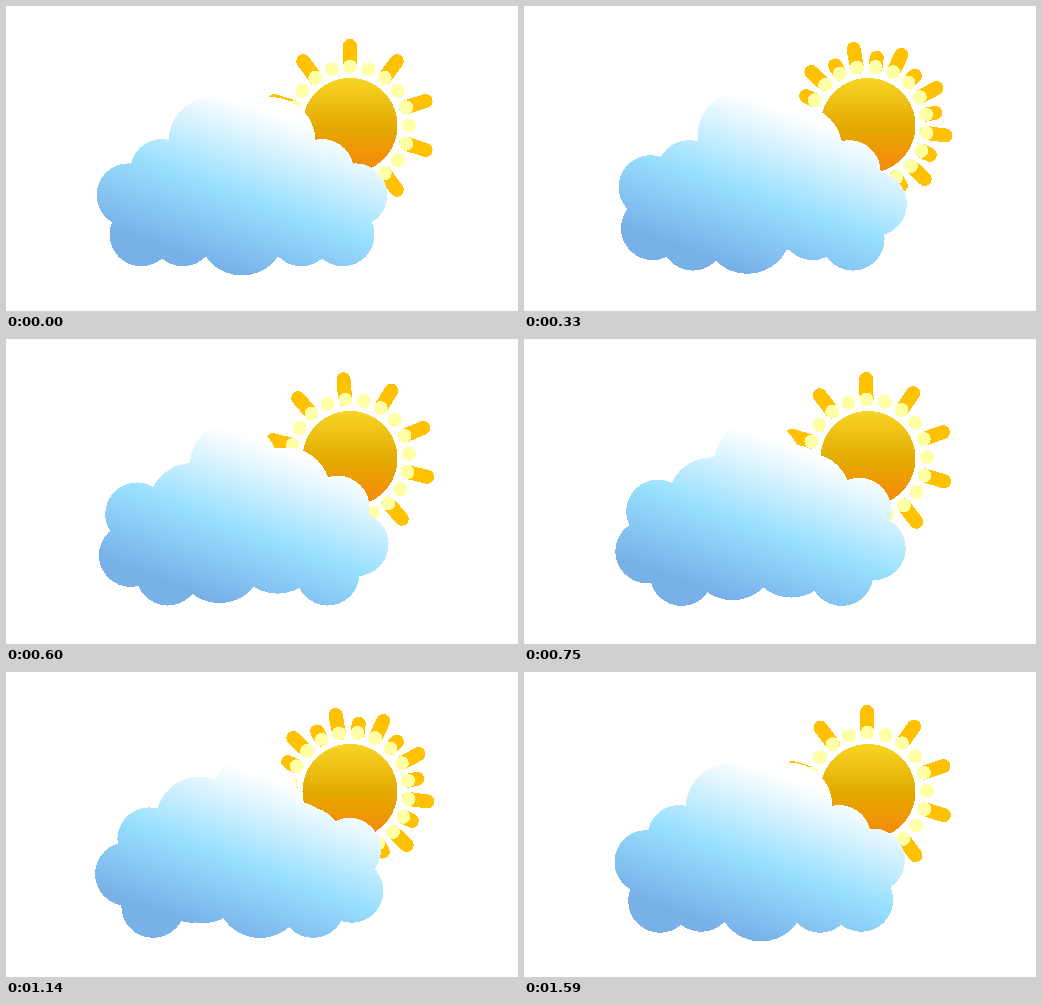
Animation of 512x305 px, one loop 1.62 s. Source, as an HTML page:

```html
<!DOCTYPE html>
<html lang="en">
<head>
<meta charset="utf-8">
<title>Sun and cloud</title>
<style>
  html, body { margin: 0; width: 100%; height: 100%; overflow: hidden; background: #fff; }
  svg { display: block; width: 100%; height: 100%; shape-rendering: crispEdges; }
</style>
</head>
<body>
<svg viewBox="0 0 512 305">
  <defs>
    <linearGradient id="sunFill" x1="0" y1="0" x2="0" y2="1">
      <stop offset="0" stop-color="#f8d526"/>
      <stop offset=".5" stop-color="#e3ab00"/>
      <stop offset=".85" stop-color="#f29108"/>
      <stop offset="1" stop-color="#f58a10"/>
    </linearGradient>
    <linearGradient id="cloudFill" gradientUnits="userSpaceOnUse" x1="236" y1="96" x2="180.2" y2="251">
      <stop offset="0" stop-color="#fff"/>
      <stop offset=".53" stop-color="#99e0ff"/>
      <stop offset="1" stop-color="#78b0e8"/>
    </linearGradient>
  </defs>
  <g id="rays" stroke="#ffc100" stroke-width="14" stroke-linecap="round"></g>
  <g id="dots" fill="#ffffa6"></g>
  <circle cx="344" cy="119.5" r="47.5" fill="url(#sunFill)"/>
  <g id="cloud" fill="url(#cloudFill)"></g>
</svg>
<script>
const LOOP = 1620, STEP = 30;
const SUN = { x: 344, y: 119.5, ring: 59, reach: 79.5, rays: 20 };
const PUFFS = 5;

// Each cluster is a wheel of puffs; all wheels turn one puff further per loop
const CLUSTERS = [
  { x: 236, y: 175.5, ring: 50, r: 44, phase: 0.5 },
  { x: 156, y: 200, ring: 35.2, r: 31.8, phase: 0 },
  { x: 316, y: 200, ring: 35.2, r: 31.8, phase: 0 }
];

function set(el, attrs) {
  for (const k in attrs) el.setAttribute(k, attrs[k]);
}
function make(tag, parent, attrs = {}) {
  const el = document.createElementNS("http://www.w3.org/2000/svg", tag);
  set(el, attrs);
  return document.getElementById(parent).appendChild(el);
}
// Point on a circle, turns counted clockwise from the top
function polar({ x, y }, radius, turns) {
  const a = turns * 2 * Math.PI;
  return [x + radius * Math.sin(a), y - radius * Math.cos(a)];
}

const rays = [], dots = [];
for (let i = 0; i < SUN.rays; i++) {
  rays.push(make("line", "rays"));
  dots.push(make("circle", "dots", { r: 7 }));
}
for (const c of CLUSTERS) {
  make("circle", "cloud", { cx: c.x, cy: c.y, r: c.ring });
  c.puffs = Array.from({ length: PUFFS }, () => make("circle", "cloud", { r: c.r }));
}

// A ray shrinks in the first half of its cycle and shoots out in the second
function reach(t) {
  const out = t < 0.5
    ? 1 - Math.min(1, t * 3) ** 1.25
    : 1 - (2 - 2 * t) ** 5;
  return SUN.ring + (SUN.reach - SUN.ring) * out;
}

function drawSun(t) {
  for (let i = 0; i < SUN.rays; i++) {
    const turns = (i + 2 * t) / SUN.rays;
    const [x1, y1] = polar(SUN, SUN.ring, turns);
    const [x2, y2] = polar(SUN, reach((t + i / 2) % 1), turns);
    set(rays[i], { x1, y1, x2, y2 });
    set(dots[i], { cx: x1, cy: y1 });
  }
}

function drawCloud(t) {
  for (const c of CLUSTERS) {
    c.puffs.forEach((puff, i) => {
      const [cx, cy] = polar(c, c.ring, (i + c.phase + t) / PUFFS);
      set(puff, { cx, cy });
    });
  }
}

const start = performance.now();
function frame() {
  const ms = Math.floor((performance.now() - start) % LOOP / STEP) * STEP;
  drawSun(ms / LOOP);
  drawCloud(ms / LOOP);
  requestAnimationFrame(frame);
}
frame();
</script>
</body>
</html>
```
